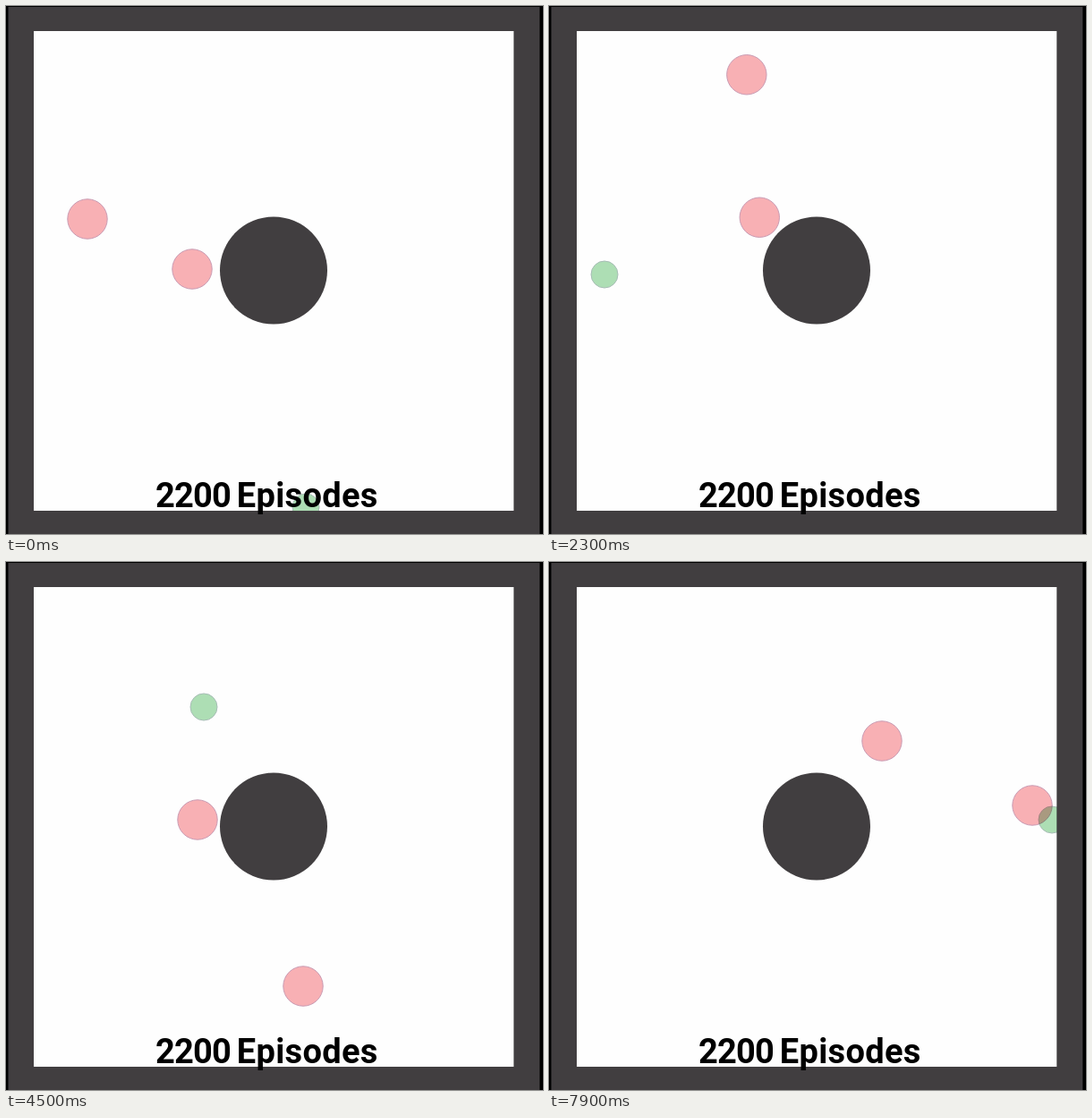
An HTML page that plays this animation: 600x590 px, repeating every 8 s.

```html
<!DOCTYPE html>
<html lang="en">
<head>
<meta charset="utf-8">
<title>Pursuit</title>
<style>
  html, body { margin: 0; width: 100%; height: 100%; overflow: hidden; background: #000; }
  svg { display: block; width: 600px; height: 590px; }
  .wall { fill: #413e40; }
  .agent { mix-blend-mode: multiply; stroke-width: 1; }
  .chaser { fill: #f9b1b5; stroke: #c99bb3; }
  .runner { fill: #aedfb5; stroke: #a8bdb6; }
  text { font: 700 38px Roboto, "Open Sans", sans-serif; fill: #000; }
  .count { letter-spacing: -0.8px; }
  .label { letter-spacing: 0.3px; }
</style>
</head>
<body>
<svg viewBox="0 0 600 590">
  <rect width="600" height="590" fill="#000"/>
  <rect x="31" y="28" width="536.6" height="536" fill="#fefefe"/>
  <circle class="agent chaser" id="chaserA" r="22.2"/>
  <circle class="agent chaser" id="chaserB" r="22.2"/>
  <circle class="agent runner" id="runner" r="15"/>
  <circle class="wall" cx="299" cy="295.5" r="60"/>
  <path class="wall" fill-rule="evenodd" d="M2.5 1H596.3V590H2.5ZM31 28V564H567.6V28Z"/>
  <text class="count" x="167" y="560">2200</text>
  <text class="label" x="257.8" y="560">Episodes</text>
</svg>
<script>
const LOOP = 8000, STEP = 100;
const POST = { x: 299, y: 295.5, r: 60 };
const LAG = 7;

// Key points: [time in steps, x, y]
const routes = {
  runner: [
    [0, 335, 560], [5, 553, 450], [9, 550, 250], [13, 340, 60], [17, 126, 60],
    [23, 62, 300], [27, 265, 180], [30, 452, 126], [36, 553, 494], [41, 445, 300],
    [45, 221, 162], [48, 310, 88], [53, 553, 355], [56, 515, 523], [63, 52, 490],
    [70, 95, 44], [75, 420, 48], [79, 562, 288]
  ],
  chaserA: [
    [0, 91, 238], [17, 205, 99], [30, 321, 163], [45, 332, 474],
    [56, 531, 383], [63, 484, 533], [70, 206, 317], [79, 540, 272]
  ],
  chaserB: [
    [0, 208, 294], [17, 339, 488], [30, 209, 234], [45, 214, 288],
    [56, 461, 307], [63, 385, 240], [70, 89, 148], [79, 372, 200]
  ]
};

const clamp = (v, lo, hi) => Math.min(hi, Math.max(lo, v));

function segment(route, time) {
  let i = 0;
  while (i < route.length - 2 && time >= route[i + 1][0]) i++;
  const span = route[i + 1][0] - route[i][0];
  return { i, span, u: (time - route[i][0]) / span };
}

// Cubic Hermite curve with slopes taken from the neighbouring points.
function glide(route, time) {
  const { i, span, u } = segment(route, time), w = 1 - u;
  const a = route[i], b = route[i + 1];
  const before = route[i - 1] || a, after = route[i + 2] || b;
  const axis = k => {
    const m = (b[k] - before[k]) / (b[0] - before[0]);
    const n = (after[k] - a[k]) / (after[0] - a[0]);
    return w * w * (1 + 2 * u) * a[k] + u * u * (3 - 2 * u) * b[k]
      + span * u * w * (w * m - u * n);
  };
  return [axis(1), axis(2)];
}

// Between key points a chaser leans towards where the runner was shortly before.
function chase(route, time) {
  const { span, u } = segment(route, time);
  const pull = Math.min(0.5, span / 30) * Math.sin(Math.PI * u);
  const prey = glide(routes.runner, Math.max(0, time - LAG));
  return glide(route, time).map((v, k) => v + pull * (prey[k] - v));
}

// Keeps a disc off the round post and inside the walls, with a little give.
function confine([x, y], r) {
  const dx = x - POST.x, dy = y - POST.y;
  const push = Math.max(1, (POST.r + r) / Math.hypot(dx, dy));
  return [
    clamp(POST.x + dx * push, 30 + r, 577 - r),
    clamp(POST.y + dy * push, 28 + r, 575 - r)
  ];
}

const agents = Object.entries(routes).map(([id, route]) => {
  const dot = document.getElementById(id);
  return { dot, route, r: dot.r.baseVal.value, move: id === "runner" ? glide : chase };
});

function draw(now) {
  const time = Math.floor((now % LOOP) / STEP);
  for (const { dot, route, r, move } of agents) {
    const [x, y] = confine(move(route, time), r);
    dot.setAttribute("cx", x);
    dot.setAttribute("cy", y);
  }
}

let start = null;
function tick(now) {
  start ??= now;
  draw(now - start);
  requestAnimationFrame(tick);
}
draw(0);
requestAnimationFrame(tick);
</script>
</body>
</html>
```
